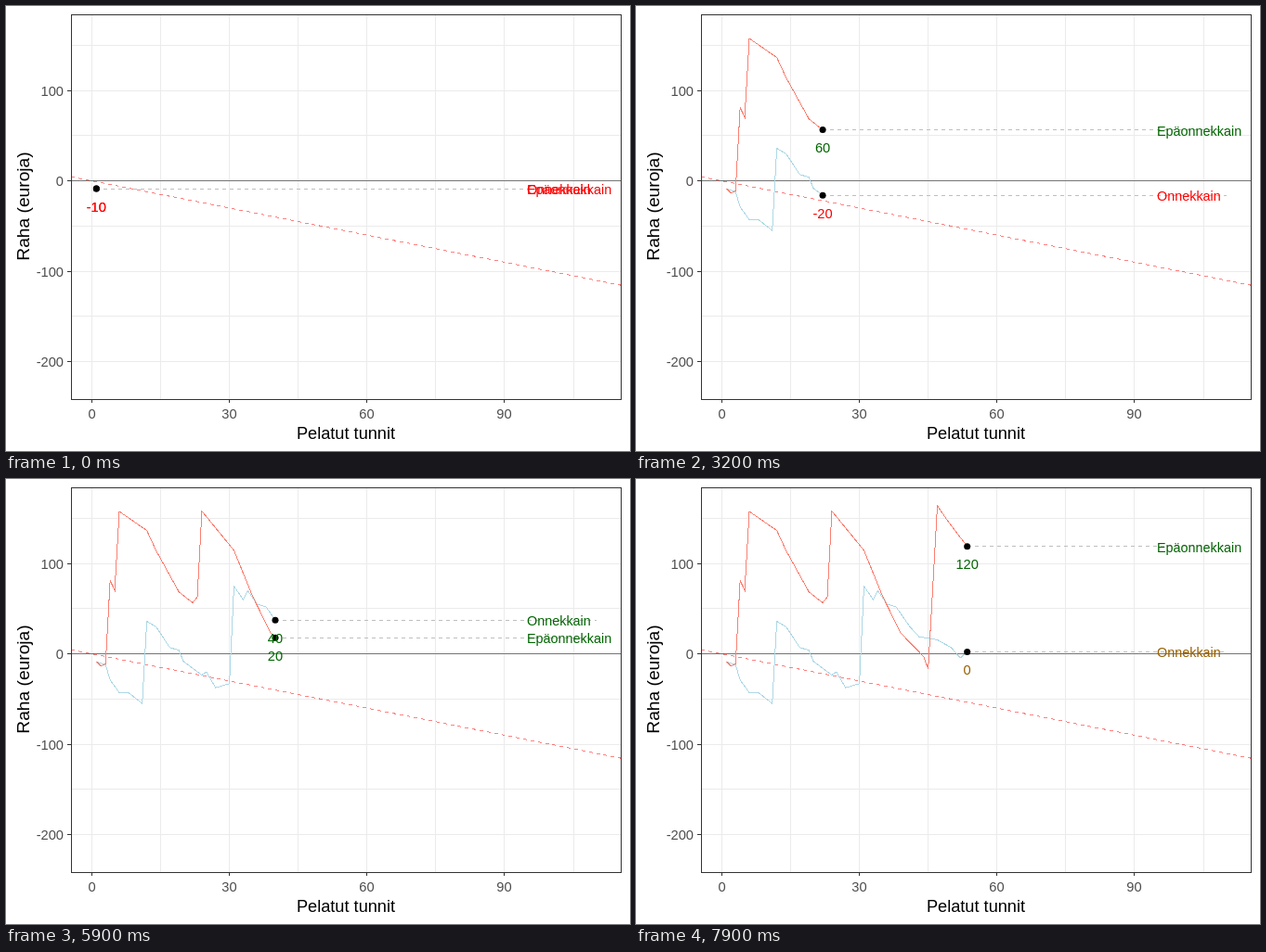
Animation, 672 px wide and 480 px high, one loop 8 s. Source, as an HTML page:

```html
<!DOCTYPE html>
<html lang="fi">
<head>
<meta charset="utf-8">
<style>
html, body { margin: 0; width: 100%; height: 100%; overflow: hidden; background: #fff; }
svg { display: block; font-family: "Liberation Sans", Arial, sans-serif; font-size: 14.67px; }
line, polyline, rect { fill: none; shape-rendering: crispEdges; }
.grid { stroke: #ebebeb; }
.axis { stroke: #333; }
.tick { fill: #4d4d4d; }
.title { text-anchor: middle; }
.name { font-size: 14.4px; }
.zero { stroke: #000; stroke-opacity: .5; }
.trend { stroke: #f00; stroke-opacity: .5; stroke-dasharray: 4; }
.guide { stroke: #bebebe; stroke-dasharray: 4; }
</style>
</head>
<body>
<svg id="chart" width="672" height="480" viewBox="0 0 672 480"></svg>
<script>
const FRAME_MS = 100, FRAMES = 80;
const RED = '#ff0000', GREEN = '#006400', BLEND = '#975f00';

// Turning points [hour, money]; straight runs between them
const series = [
  { name: 'Onnekkain', color: '#add8e6', keys: [
    [1, -8.7], [3, -12], [4, -29], [6, -43], [8, -43], [11, -55], [12, 36],
    [14, 30], [17, 7], [19, 4], [20, -8.5], [24, -23.5], [25, -20], [27, -37.5],
    [30, -33], [31, 75], [33, 60], [34, 70], [36, 55], [38, 52], [41, 30],
    [43, 19], [47, 15.5], [50, 7], [52, -4.5], [54, 4.5]] },
  { name: 'Epäonnekkain', color: '#fa8072', keys: [
    [1, -8.7], [2, -13.5], [3, -11], [4, 81], [5, 70.5], [6, 157.6], [12, 136.5],
    [14, 114.5], [19, 68.5], [22, 56.5], [23, 63], [24, 158], [31, 114.5],
    [35, 64.5], [39, 23], [44, -3], [45, -17], [47, 164], [49, 149], [54, 115.5]] }
];

const svg = document.getElementById('chart');
const px = h => 92.4 + 4.9395 * h;
const py = v => 188.6 - 0.9745 * v;
const snap = n => Math.floor(n) + 0.5;
const mix = (a, b, k) => a + (b - a) * k;

function set(el, attrs) {
  for (const key in attrs) el.setAttribute(key, attrs[key]);
}
function add(tag, attrs, text) {
  const el = document.createElementNS('http://www.w3.org/2000/svg', tag);
  set(el, attrs);
  if (text !== undefined) el.textContent = text;
  return svg.appendChild(el);
}
function line(x1, y1, x2, y2, name) {
  add('line', { x1, y1, x2, y2, class: name });
}

function drawPanel() {
  for (let h = 0; h <= 105; h += 15) {
    const x = snap(px(h));
    line(x, 9, x, 424, 'grid');
    if (h % 30 === 0) {
      line(x, 424, x, 428, 'axis');
      add('text', { x, y: 445, class: 'tick', 'text-anchor': 'middle' }, h);
    }
  }
  for (let v = -200; v <= 150; v += 50) {
    const y = snap(py(v));
    line(70, y, 662, y, 'grid');
    if (v % 100 === 0) {
      line(66, y, 70, y, 'axis');
      add('text', { x: 62, y: y + 5.5, class: 'tick', 'text-anchor': 'end' }, v);
    }
  }
  line(70, 188.5, 662, 188.5, 'zero');
  line(70.5, py(4.45), 662, py(-115.45), 'trend');
  add('text', { x: 366, y: 467, class: 'title', 'font-size': 18.2 }, 'Pelatut tunnit');
  add('text', { transform: 'translate(24.5 216) rotate(-90)', class: 'title', 'font-size': 19.2 }, 'Raha (euroja)');
}

drawPanel();
for (const s of series) s.path = add('polyline', { stroke: s.color });
for (const s of series) s.guide = add('line', { class: 'guide' });
for (const s of series) s.dot = add('circle', { r: 3.5 });
for (const s of series) s.value = add('text', { 'text-anchor': 'middle' });
for (const s of series) s.label = add('text', { x: 561, class: 'name' }, s.name);
add('rect', { x: 70.5, y: 9.5, width: 592, height: 415, class: 'axis' });

// Each hour lands on a whole step; steps in between are interpolated
const stepOf = hour => Math.round((hour - 1) * 149 / 99);
const tens = v => Math.round(v / 10) * 10;
const tone = v => v > 0 ? GREEN : RED;

function moneyAt(keys, hour) {
  const i = Math.max(1, keys.findIndex(([h]) => h >= hour));
  const [h0, v0] = keys[i - 1], [h1, v1] = keys[i];
  return mix(v0, v1, (hour - h0) / (h1 - h0));
}

function draw(step) {
  let hour = 1;
  while (stepOf(hour + 1) <= step) hour++;
  const from = stepOf(hour);
  const k = (step - from) / (stepOf(hour + 1) - from);
  const x = px(hour + k);

  for (const s of series) {
    const a = moneyAt(s.keys, hour);
    const b = k ? moneyAt(s.keys, hour + 1) : a;
    const y = py(mix(a, b, k));
    const fill = tone(a) === tone(b) ? tone(a) : BLEND;
    const points = s.keys.filter(([h]) => h <= hour).map(([h, v]) => [px(h), py(v)]);
    points.push([x, y]);
    set(s.path, { points: points.join(' ') });
    set(s.guide, { x1: x, y1: snap(y), x2: px(110), y2: snap(y) });
    set(s.dot, { cx: x, cy: y });
    set(s.value, { x, y: y + 24.5, fill });
    s.value.textContent = mix(tens(a), tens(b), k);
    set(s.label, { y: y + 6, fill });
  }
}

const start = performance.now();
function tick() {
  const t = Math.max(0, performance.now() - start);
  draw(Math.floor(t / FRAME_MS) % FRAMES);
  requestAnimationFrame(tick);
}
tick();
</script>
</body>
</html>
```
